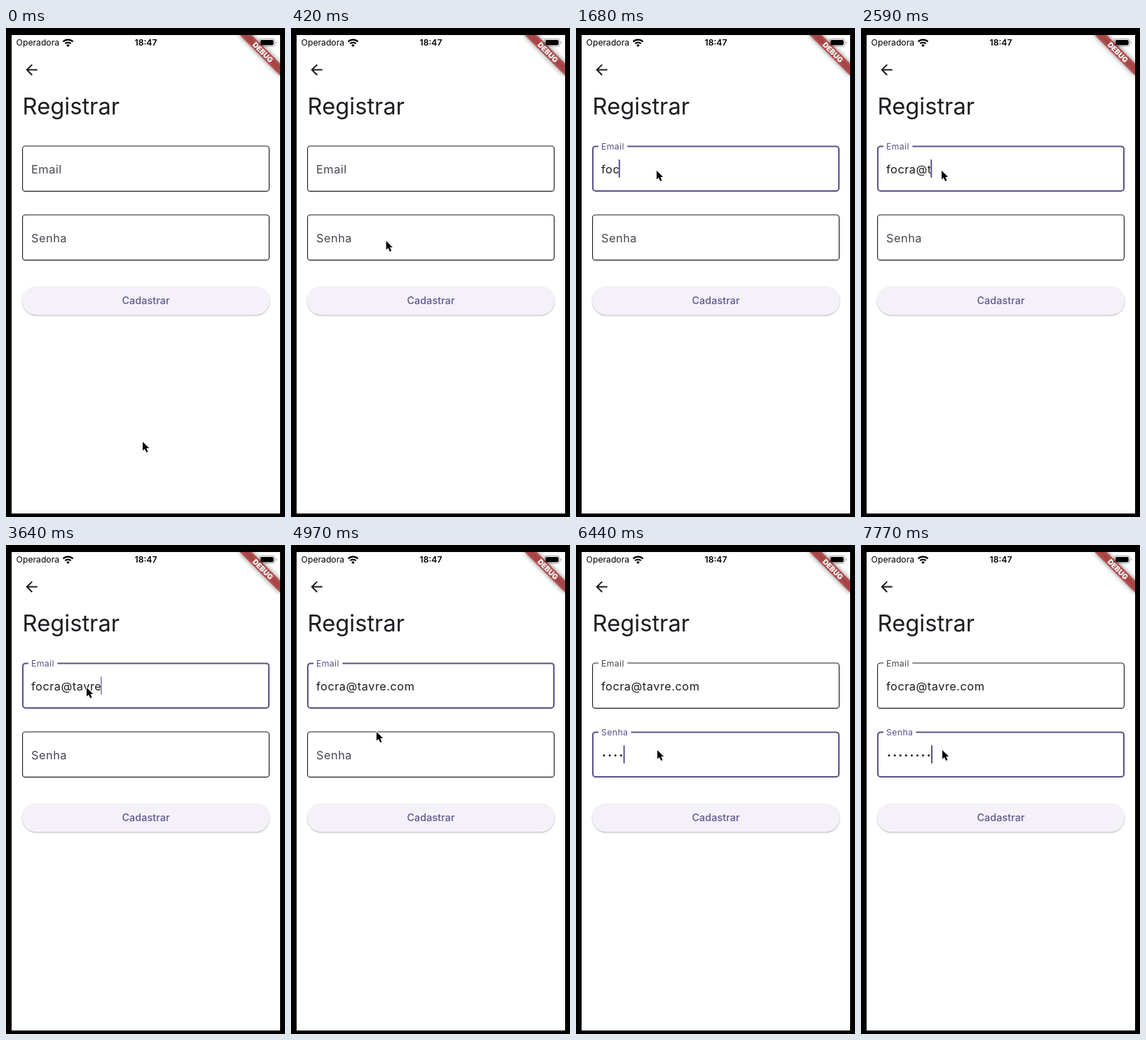
An HTML page that plays this animation: 398x696 px, repeating every 8 s.

```html
<!DOCTYPE html>
<html lang="pt">
<head>
<meta charset="utf-8">
<title>Registrar</title>
<style>
  html, body { margin: 0; width: 100%; height: 100%; overflow: hidden; background: #000; }
  svg { display: block; width: 398px; height: 696px; font-family: Inter, Roboto, sans-serif; }
  .input { font-size: 16.34px; letter-spacing: .51px; }
</style>
</head>
<body>
<svg viewBox="0 0 398 696">
  <defs>
    <clipPath id="screen"><rect x="8" y="10" width="383" height="681"/></clipPath>
    <filter id="bannerBlur" x="-30%" y="-150%" width="160%" height="400%"><feGaussianBlur stdDeviation="3.9"/></filter>
    <filter id="buttonBlur" x="-5%" y="-20%" width="110%" height="140%"><feGaussianBlur stdDeviation="1"/></filter>
  </defs>
  <rect width="398" height="696" fill="#000"/>
  <g clip-path="url(#screen)">
    <rect x="8" y="10" width="383" height="681" fill="#fff"/>
    <path transform="translate(24.3 47.3) scale(1.021)" fill="#1d1b20"
      d="M20 11H7.83l5.59-5.59L12 4l-8 8 8 8 1.41-1.41L7.83 13H20v-2z"/>
    <text x="23.6" y="123" font-size="32.7" fill="#1d1b20">Registrar</text>
    <g id="fields"></g>

    <rect x="23.3" y="369.2" width="352.6" height="40" rx="20" opacity=".32" filter="url(#buttonBlur)"/>
    <rect x="23" y="367.8" width="353" height="40.6" rx="20.3" fill="#f4f1f9"/>
    <text x="199.5" y="393.3" font-size="14.3" font-weight="500" letter-spacing=".1"
      text-anchor="middle" fill="#5f5590">Cadastrar</text>

    <g transform="translate(391 10) rotate(45) scale(1.021)">
      <rect x="-40" y="28" width="80" height="12" opacity=".5" filter="url(#bannerBlur)"/>
      <rect x="-40" y="28" width="80" height="12" fill="#b71c1c" fill-opacity=".627"/>
      <text x="0" y="37.7" font-size="10.2" font-weight="900" text-anchor="middle" fill="#fff">DEBUG</text>
    </g>

    <text x="14.6" y="25.3" font-size="12.2" fill="#000">Operadora</text>
    <g fill="none" stroke="#000" stroke-width="2.1">
      <path d="M81.5 19.5A10 10 0 0 1 95.5 19.5"/>
      <path d="M84.3 22.3A6 6 0 0 1 92.7 22.3"/>
    </g>
    <path d="M88.5 27L86.2 24.4A3.3 3.3 0 0 1 90.8 24.4Z"/>
    <text x="199.5" y="25.3" font-size="12.2" font-weight="600" text-anchor="middle">18:47</text>
    <rect x="361.4" y="15.4" width="22" height="10.8" rx="3.2" fill="none" stroke="#000" stroke-opacity=".35"/>
    <path d="M384.9 19v3.6a2 2 0 0 0 0-3.6z" opacity=".4"/>
    <rect x="363" y="17" width="18.8" height="7.6" rx="2"/>
  </g>
  <path id="pointer" d="M0 0V12.6L2.9 9.9L5.2 15.1L7.5 14.1L5.3 9.1H9.2Z"
    stroke="#fff" stroke-width="1.8" stroke-linejoin="round" paint-order="stroke"/>
</svg>
<script>
const LOOP = 8000, STEP = 70, FADE = 167;
const INK = [29, 27, 32], GRAY = [73, 69, 79], PRIMARY = [90, 80, 136];
const EMAIL = 'focra@tavre.com';
const EMAIL_FOCUS = 715, PASSWORD_FOCUS = 5321;

// [time, number of characters]
const emailKeys = [[770, 0], [1400, 1], [1470, 2], [1680, 3], [1890, 4], [1960, 5], [2240, 6],
  [2590, 7], [2660, 8], [2800, 9], [3080, 11], [3710, 12], [3920, 13], [4130, 15]];
const passwordKeys = [[5390, 0], [5740, 1], [5950, 2], [6160, 3], [6440, 4], [6510, 5],
  [7280, 6], [7630, 7], [7770, 8]];
// [time, x, y]
const pointerKeys = [[0, 195, 589], [630, 115, 203], [4690, 115, 203], [4970, 122, 266], [5180, 116, 292]];

const clamp = v => Math.max(0, Math.min(1, v));
const lerp = (a, b, p) => a + (b - a) * p;
const mix = (a, b, p) => `rgb(${a.map((v, i) => Math.round(lerp(v, b[i], p)))})`;

function add(parent, tag, attrs = {}) {
  const el = document.createElementNS('http://www.w3.org/2000/svg', tag);
  parent.append(el);
  return set(el, attrs);
}
function set(el, attrs) {
  for (const key in attrs) el.setAttribute(key, attrs[key]);
  return el;
}

// cubic-bezier(.4, 0, .2, 1)
function ease(x) {
  if (x <= 0 || x >= 1) return clamp(x);
  let lo = 0, hi = 1;
  for (let i = 0; i < 24; i++) {
    const u = (lo + hi) / 2, v = 1 - u;
    if (1.2 * v * v * u + .6 * v * u * u + u ** 3 < x) lo = u; else hi = u;
  }
  return 3 * (1 - lo) * lo * lo + lo ** 3;
}
const since = (t, start) => ease((t - start) / FADE);

function caretOpacity(age) {
  const phase = age % 1000 / 1000;
  return phase < .75 ? 1 - clamp((phase - .5) / .15) : clamp((phase - .85) / .15);
}

function pointerAt(t) {
  const i = pointerKeys.findIndex(k => k[0] > t);
  if (i < 0) return pointerKeys.at(-1).slice(1);
  const [t0, x0, y0] = pointerKeys[i - 1], [t1, x1, y1] = pointerKeys[i];
  const u = (t - t0) / (t1 - t0), p = u * u * (3 - 2 * u);
  return [lerp(x0, x1, p), lerp(y0, y1, p)];
}

function outline(top, inset, gap) {
  const l = 23 + inset, r = 376 - inset, y = top + inset, b = top + 65.6 - inset, c = 4;
  return `M${32 + gap} ${y}H${r - c}a${c} ${c} 0 0 1 ${c} ${c}V${b - c}a${c} ${c} 0 0 1 ${-c} ${c}` +
    `H${l + c}a${c} ${c} 0 0 1 ${-c} ${-c}V${y + c}a${c} ${c} 0 0 1 ${c} ${-c}H32`;
}

function makeField(top, label, gap, keys, secret) {
  const g = add(document.getElementById('fields'), 'g');
  const border = add(g, 'path', { fill: 'none' });
  const caption = add(g, 'text', { class: 'input' });
  caption.textContent = label;
  const value = add(g, 'text', { class: 'input', x: 36, y: top + 39.4, fill: mix(INK, INK, 0) });
  const dots = Array.from({ length: secret ? 8 : 0 }, (_, i) =>
    add(g, 'circle', { cx: 40 + 8.1 * i, cy: top + 34.2, r: 1.5, fill: mix(INK, INK, 0) }));
  const caret = add(g, 'rect', { y: top + 19.6, width: 2, height: 26, rx: 1, fill: mix(PRIMARY, PRIMARY, 0) });

  return (t, lift, focus, active) => {
    const width = 1.15 + .85 * focus;
    set(border, { d: outline(top, width / 2, gap * lift), stroke: mix(INK, PRIMARY, focus), 'stroke-width': width });
    set(caption, {
      fill: mix(GRAY, PRIMARY, Math.sqrt(focus)),
      transform: `translate(36 ${top + lerp(39.4, 6, lift)}) scale(${1 - .25 * lift})`
    });
    const [time, count] = keys.findLast(k => k[0] <= t) || [0, 0];
    let end = 8.1 * count + .6 * Math.sign(count);
    if (secret) {
      dots.forEach((dot, i) => set(dot, { opacity: i < count ? 1 : 0 }));
    } else {
      value.textContent = EMAIL.slice(0, count);
      end = count ? value.getComputedTextLength() : 0;
    }
    set(caret, { x: 34.6 + end, opacity: active ? caretOpacity(t - time) : 0 });
  };
}

const drawEmail = makeField(167.4, 'Email', 41.3, emailKeys, false);
const drawPassword = makeField(265.4, 'Senha', 46.5, passwordKeys, true);
const pointer = document.getElementById('pointer');

function draw(now) {
  const t = Math.min(Math.floor(now % LOOP / STEP) * STEP, 7770);
  const first = since(t, EMAIL_FOCUS), second = since(t, PASSWORD_FOCUS);
  drawEmail(t, first, first - second, t >= EMAIL_FOCUS && t < PASSWORD_FOCUS);
  drawPassword(t, second, second, t >= PASSWORD_FOCUS);
  set(pointer, { transform: `translate(${pointerAt(t)})` });
}

const start = performance.now();
function tick() {
  draw(performance.now() - start);
  requestAnimationFrame(tick);
}
tick();
</script>
</body>
</html>
```
